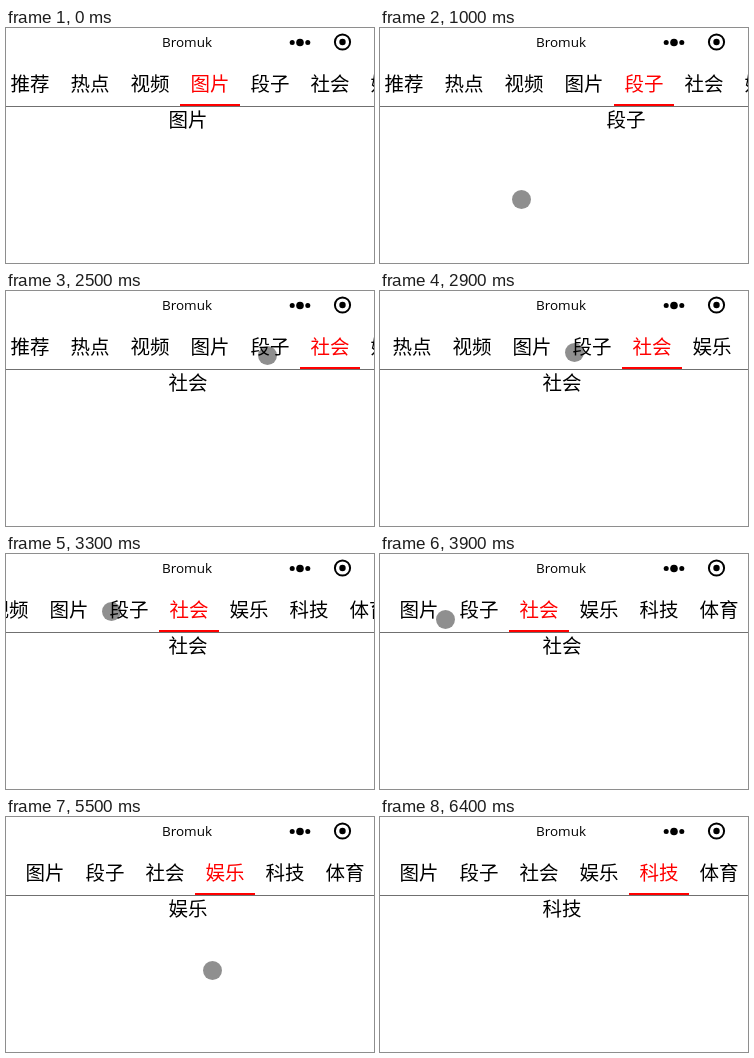
An HTML page with a canvas for the animation above (6900 ms loop, 368x235 px).

```html
<!DOCTYPE html>
<html lang="zh">
<head>
<meta charset="utf-8">
<title>Tabs</title>
<style>
  html, body { margin: 0; width: 100%; height: 100%; overflow: hidden; background: #fff; }
  canvas { display: block; width: 368px; height: 235px; }
</style>
</head>
<body>
<canvas id="stage" width="368" height="235"></canvas>
<script>
const W = 368, H = 235, LOOP = 6900, STEP = 100;
const TABS = ['推荐', '热点', '视频', '图片', '段子', '社会', '娱乐', '科技', '体育'];
const FIRST = 3, TAB_W = 60, MAX_SCROLL = 165;
const CJK = '300 19.5px "Noto Sans CJK SC", "Noto Sans CJK", sans-serif';

const linear = p => p;
const easeIn = p => p * p;
const easeOut = p => 1 - (1 - p) * (1 - p);
const progress = (t, from, to) => Math.max(0, Math.min(1, (t - from) / (to - from)));

// The page follows the finger for PULL ms, then glides home after the release.
const PULL = 300, GLIDE = 450;
const SWIPES = [
  { release: 800, pull: 160 },
  { release: 1900, pull: 85 },
  { release: 4700, pull: 113 },
  { release: 5800, pull: 165 }
];

// The pointer rests between moves.
const SHOW = 100, HIDE = 6400, ORIGIN = { x: 255, y: 160 };
const TAB_DRAG = { from: 2600, to: 3300, x: 105, y: 57, ease: linear };
const TAB_NUDGE = { from: 3300, to: 4000, x: 58, y: 66, ease: linear };
const MOVES = [
  { from: 100, to: 400, x: 238, y: 181, ease: linear },
  { from: 500, to: 700, x: 105, y: 171, ease: easeIn },
  { from: 900, to: 1300, x: 247, y: 170, ease: linear },
  { from: 1700, to: 1900, x: 142, y: 171, ease: easeIn },
  { from: 2100, to: 2500, x: 261, y: 64, ease: linear },
  TAB_DRAG,
  TAB_NUDGE,
  { from: 4000, to: 4400, x: 215, y: 147, ease: easeOut },
  { from: 4500, to: 4900, x: 70, y: 152, ease: easeOut },
  { from: 5100, to: 5500, x: 206, y: 153, ease: easeIn },
  { from: 5500, to: 5900, x: 83, y: 150, ease: linear },
  { from: 6000, to: 6300, x: 265, y: 138, ease: linear }
];

const ctx = document.getElementById('stage').getContext('2d');

function pointer(t) {
  let { x, y } = ORIGIN;
  for (const m of MOVES) {
    const k = m.ease(progress(t, m.from, m.to));
    x += (m.x - x) * k;
    y += (m.y - y) * k;
  }
  return { x, y };
}

function swipeShift({ release, pull }, t) {
  if (t < release) return pull * progress(t, release - PULL, release) ** 4;
  return pull + (W - pull) * easeOut(progress(t, release, release + GLIDE));
}

function tabScroll(t) {
  if (t <= TAB_DRAG.from) return 0;
  const x = pointer(Math.min(t, TAB_NUDGE.to)).x;
  return Math.max(0, Math.min(MAX_SCROLL, 246 - x));
}

function text(str, x, y, color, font) {
  ctx.font = font;
  ctx.fillStyle = color;
  ctx.fillText(str, x, y);
}

function dot(x, y, r, color) {
  ctx.fillStyle = color;
  ctx.beginPath();
  ctx.arc(x, y, r, 0, Math.PI * 2);
  ctx.fill();
}

function drawHeader() {
  text('Bromuk', 181, 19, '#000', '13.5px "Open Sans", "Noto Sans", sans-serif');
  for (const side of [-1, 0, 1]) dot(294 + side * 7.8, 14.5, side ? 2.5 : 3.8, '#000');
  dot(336.5, 14, 3.2, '#000');
  ctx.strokeStyle = '#000';
  ctx.lineWidth = 2;
  ctx.beginPath();
  ctx.arc(336.5, 14, 7.6, 0, Math.PI * 2);
  ctx.stroke();
}

function drawTabs(active, scroll) {
  TABS.forEach((name, i) => {
    const x = 24 + i * TAB_W - scroll;
    text(name, x, 63, i === active ? '#f00' : '#000', CJK);
    if (i === active) ctx.fillRect(x - TAB_W / 2, 76, TAB_W, 2);
  });
  ctx.fillStyle = '#707070';
  ctx.fillRect(0, 78, W, 1);
}

function drawPages(shift) {
  for (let i = FIRST; i < TABS.length; i++) {
    text(TABS[i], 182 + (i - FIRST) * W - shift, 99, '#000', CJK);
  }
}

function draw(t) {
  ctx.fillStyle = '#fff';
  ctx.fillRect(0, 0, W, H);
  ctx.textAlign = 'center';
  const active = FIRST + SWIPES.filter(s => t >= s.release).length;
  const shift = SWIPES.reduce((sum, s) => sum + swipeShift(s, t), 0);
  drawHeader();
  drawTabs(active, Math.round(tabScroll(t)));
  drawPages(Math.round(shift));
  if (t >= SHOW && t < HIDE) {
    const { x, y } = pointer(t);
    dot(Math.round(x) + 0.5, Math.round(y) + 0.5, 9.5, 'rgba(0,0,0,0.44)');
  }
}

const start = performance.now();
function tick() {
  const ms = (performance.now() - start) % LOOP;
  draw(Math.floor(ms / STEP) * STEP);
  requestAnimationFrame(tick);
}
tick();
</script>
</body>
</html>
```
